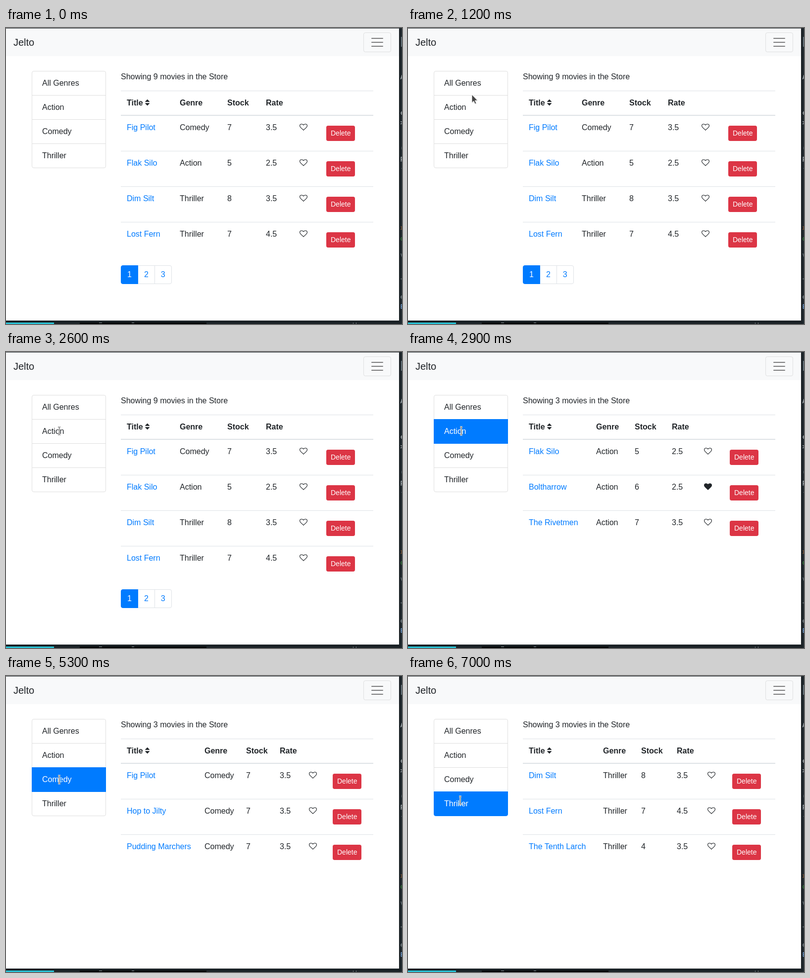
These frames come from a looping animation (800 px wide and 600 px high, 8 s). An HTML page:

```html
<!DOCTYPE html>
<html lang="en">
<head>
<meta charset="utf-8">
<title>Movie list</title>
<style>
  html, body { margin: 0; width: 100%; height: 100%; overflow: hidden; }
  body { font: 16px/24px "Liberation Sans", Arial, sans-serif; color: #212529; }
  * { box-sizing: border-box; }
  #stage { position: absolute; left: 0; top: 0; width: 800px; height: 600px; background: #1b2226; overflow: hidden; }
  #stage svg, .abs { position: absolute; white-space: nowrap; }
  #page { left: 0; top: 1px; width: 794px; height: 592px; background: #fff; }
  #nav { left: 0; top: 1px; width: 794px; height: 56px; background: #f8f9fa; }
  #brand { left: 15px; top: 14px; font-size: 20px; line-height: 30px; }
  #toggle { left: 722px; top: 9px; width: 56px; height: 40px; border: 1px solid rgba(0,0,0,.1); border-radius: 4px; }
  .genre { left: 52px; width: 150px; height: 50px; padding: 12px 20px; border: 1px solid #dfdfdf; background: #fff; }
  .genre:first-child { border-radius: 4px 4px 0 0; }
  .genre:last-child { border-radius: 0 0 4px 4px; }
  .genre.on { z-index: 1; color: #fff; background: #007bff; border-color: #007bff; }
  .rule { left: 232px; width: 510px; height: 1px; background: #dee2e6; }
  .head { font-weight: bold; }
  .link { color: #007bff; }
  .del { font-size: 14px; line-height: 21px; padding: 4px 8px; border: 1px solid #dc3545; border-radius: 3.2px; background: #dc3545; color: #fff; }
  #pages { left: 232px; top: 481px; display: flex; }
  #pages span { padding: 8px 12px; line-height: 20px; border: 1px solid #dee2e6; color: #007bff; background: #fff; margin-left: -1px; }
  #pages span:first-child { margin-left: 0; color: #fff; background: #007bff; border-color: #007bff; border-radius: 4px 0 0 4px; position: relative; }
  #pages span:last-child { border-radius: 0 4px 4px 0; }
</style>
</head>
<body>
<div id="stage">
  <svg width="800" height="600" id="desk" font-family="DejaVu Sans Mono, monospace" font-size="13">
    <rect width="800" height="1" fill="#30373b"/>
    <rect x="797" width="3" height="600" fill="#20292e"/>
    <rect x="798" y="18" width="2" height="20" fill="#66737a"/>
    <rect x="149" y="597" width="256" height="3" fill="#020405"/>
    <rect y="597" width="97" height="3" fill="#26c0d3"/>
    <path d="M188 597.5h6M254 597.5h5" stroke="#7d868a"/>
    <path d="M701.5 597v3M707.5 597v3" stroke="#6a7377"/>
  </svg>
  <div class="abs" id="page"></div>
  <div class="abs" id="nav"></div>
  <div class="abs" id="brand">Jelto</div>
  <div class="abs" id="toggle"></div>
  <svg style="left:735px;top:14px" width="30" height="30">
    <path d="M4 7h22M4 15h22M4 23h22" stroke="rgba(0,0,0,.5)" stroke-width="2" stroke-linecap="round"/>
  </svg>
  <div id="side"></div>
  <div id="main"></div>
  <svg id="pointer" width="800" height="600" style="left:0;top:0;z-index:2">
    <g id="arrow">
      <path d="M1 1.5V17L4.6 13.6 7.2 19.6 9.8 18.4 7.3 12.6H12Z" fill="#000" opacity=".18"/>
      <path d="M0 0V16.5L3.7 13 6.3 18.8 8.9 17.6 6.4 12H11.5Z" fill="#444" stroke="#fff" stroke-width=".9"/>
    </g>
    <g id="beam" fill="none">
      <path d="M-3 -8H-1.5L-.5 -7.3 .5 -8H2M-3 8H-1.5L-.5 7.3 .5 8H2M-.5 -7V7" stroke="#fff" stroke-width="3"/>
      <path d="M-3 -8H-1.5L-.5 -7.3 .5 -8H2M-3 8H-1.5L-.5 7.3 .5 8H2M-.5 -7V7" stroke="#333"/>
    </g>
  </svg>
</div>
<script>
const LOOP = 8000, STEP = 100;
const $ = id => document.getElementById(id);
const genres = ["All Genres", "Action", "Comedy", "Thriller"];

// title, genre, stock, rate, liked
const movies = [
  ["Fig Pilot", "Comedy", 7, "3.5"],
  ["Flak Silo", "Action", 5, "2.5"],
  ["Dim Silt", "Thriller", 8, "3.5"],
  ["Lost Fern", "Thriller", 7, "4.5"],
  ["Boltharrow", "Action", 6, "2.5", true],
  ["The Rivetmen", "Action", 7, "3.5"],
  ["Hop to Jilty", "Comedy", 7, "3.5"],
  ["Pudding Marchers", "Comedy", 7, "3.5"],
  ["The Tenth Larch", "Thriller", 4, "3.5"]
];

// start time, selected genre, column positions
const views = [
  { at: 0, genre: "", cols: [244, 351, 447, 525, 593, 647] },
  { at: 2900, genre: "Action", cols: [244, 380, 458, 533, 598, 650] },
  { at: 5300, genre: "Comedy", cols: [244, 401, 485, 553, 612, 660] },
  { at: 7000, genre: "Thriller", cols: [244, 394, 471, 543, 605, 655] }
];

// time, x, y, text cursor; positions glide between neighbours in 100 ms steps
const path = [
  [400, 19, -6], [600, 76, 78], [800, 126, 126], [1000, 140, 136], [1200, 129, 135],
  [1300, 128, 140], [1400, 126, 137], [1700, 118, 104], [1900, 118, 104],
  [2000, 117, 130], [2100, 117, 155], [2200, 117, 155], [2300, 118, 149],
  [2400, 109, 161, 1], [2500, 109, 161, 1], [2600, 108, 160, 1], [4000, 108, 160, 1],
  [4100, 105, 168, 1], [4200, 106, 186], [4300, 108, 213, 1], [4400, 108, 210, 1],
  [6100, 108, 210, 1], [6200, 105, 220, 1], [6300, 108, 236], [6400, 112, 260, 1],
  [6500, 112, 254, 1], [6600, 112, 254, 1], [6700, 106, 252, 1], [8000, 106, 252, 1]
];

const box = (x, y, text, cls = "") =>
  `<div class="abs ${cls}" style="left:${x}px;top:${y}px">${text}</div>`;
const rule = (y, h = 1) => `<div class="abs rule" style="top:${y}px;height:${h}px"></div>`;

const heart = (x, y, full) =>
  `<svg style="left:${x}px;top:${y + 3.29}px" width="16" height="16">
   <path d="M8 14.2L2.5 8.95C1.1 7.5 .57 6.4 .57 5.32C.57 3 2 1.71 4.27 1.71C5.9 1.71 7.2 2.85 8 3.75
   C8.8 2.85 10.1 1.71 11.73 1.71C14 1.71 15.43 3 15.43 5.32C15.43 6.4 14.9 7.5 13.5 8.95Z"
   fill="${full ? "#212529" : "none"}" stroke="#212529" stroke-width="1.14" stroke-linejoin="round"/></svg>`;

const sortIcon =
  `<svg style="left:281.3px;top:143.3px" width="10" height="16">
   <path d="M.6 6.3L4.57 2.3 8.54 6.3ZM.6 9.7L4.57 13.7 8.54 9.7Z"
   fill="#212529" stroke="#212529" stroke-width="1.1" stroke-linejoin="round"/></svg>`;

function row([title, genre, stock, rate, liked], i, cols) {
  const y = 190 + i * 72;
  return (i ? rule(y - 13) : "") +
    box(cols[0], y, title, "link") + box(cols[1], y, genre) +
    box(cols[2], y, stock) + box(cols[3], y, rate) +
    heart(cols[4], y, liked) + box(cols[5], y + 8, "Delete", "del");
}

function drawView({ genre, cols }) {
  const found = movies.filter(m => !genre || m[1] === genre);
  $("side").innerHTML = genres.map((g, i) =>
    box(52, 87 + i * 49, g, g === genre ? "genre on" : "genre")).join("");
  $("main").innerHTML =
    box(232, 87, `Showing ${found.length} movies in the Store`) +
    rule(127) + rule(176, 2) +
    ["Title", "Genre", "Stock", "Rate"].map((h, i) => box(cols[i], 140, h, "head")).join("") +
    sortIcon +
    found.slice(0, 4).map((m, i) => row(m, i, cols)).join("") +
    (found.length > 4
      ? `<div class="abs" id="pages"><span>1</span><span>2</span><span>3</span></div>` : "");
}

function drawPointer(time) {
  const t = Math.floor(time / STEP) * STEP;
  const n = path.findIndex(p => p[0] > t);
  const shown = n > 0;
  $("pointer").style.display = shown ? "" : "none";
  if (!shown) return;
  const a = path[n - 1], b = path[n];
  const k = (t - a[0]) / (b[0] - a[0]);
  const x = Math.round(a[1] + (b[1] - a[1]) * k);
  const y = Math.round(a[2] + (b[2] - a[2]) * k);
  $("arrow").style.display = a[3] ? "none" : "";
  $("beam").style.display = a[3] ? "" : "none";
  $(a[3] ? "beam" : "arrow").setAttribute("transform", `translate(${x} ${y})`);
}

// clipped letters of the window behind
const scraps = [
  ["A", 104, "#b9c2c6"], ["c", 176, "#d5dadc"], [">", 196, "#d5dadc"], ["(", 248, "#68747a"],
  ["p", 268, "#c3cacd"], ["-", 288, "#68747a"], ["x", 409, "#a96a35"], ["o", 431, "#3d8f3f"],
  ["v", 464, "#7d888d"], ["+", 513, "#7d888d"], ["e", 549, "#8b959a"], ["E", 569, "#7fb0e8"]
];
$("desk").innerHTML += scraps.map(([c, y, fill]) =>
  `<text x="796.5" y="${y}" fill="${fill}">${c}</text>`).join("");

let current = null;
function frame() {
  const t = performance.now() % LOOP;
  const view = views.filter(v => v.at <= t).pop();
  if (view !== current) drawView(current = view);
  drawPointer(t);
  requestAnimationFrame(frame);
}
frame();
</script>
</body>
</html>
```
